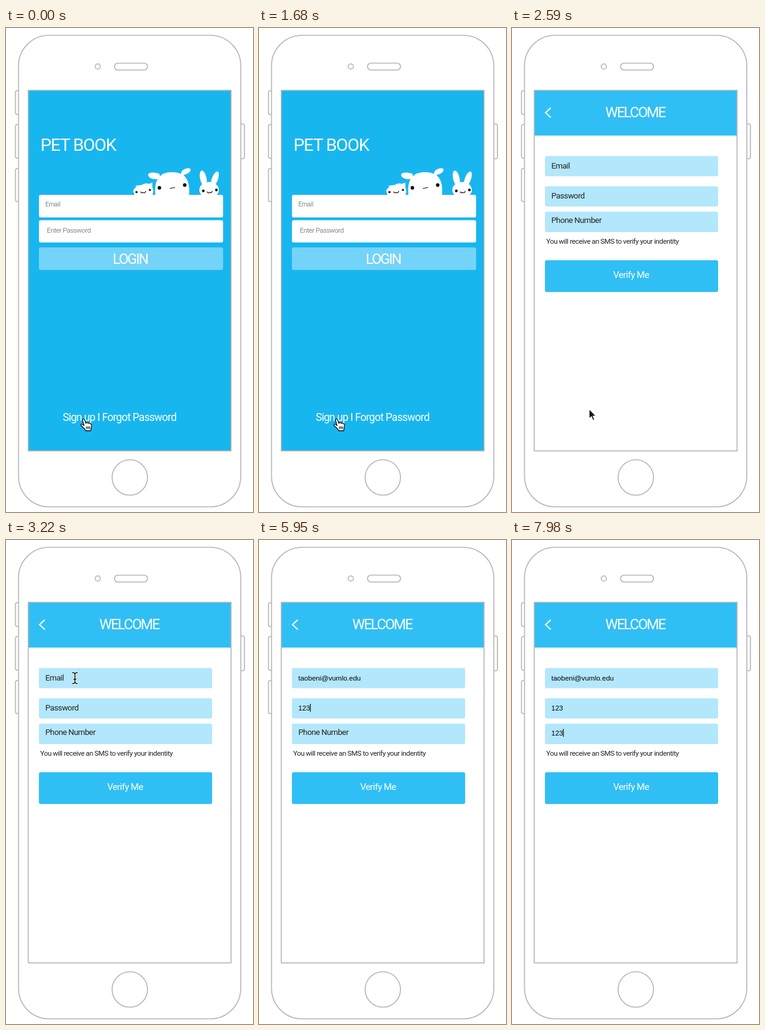
An HTML page for the animation above (8 s loop, 405 by 792 pixels).

```html
<!DOCTYPE html>
<html lang="en">
<head>
<meta charset="utf-8">
<title>Sign up flow</title>
<style>
  html, body { margin: 0; width: 100%; height: 100%; overflow: hidden; background: #fff; }
  svg { display: block; width: 100%; height: 100%; }
  text { font-family: Roboto, sans-serif; letter-spacing: -.04em; white-space: pre; }
  .caps { letter-spacing: -.08em; }
  .typed { font: 11.5px "Liberation Sans", Arial, sans-serif; letter-spacing: 0; }
  .case { fill: #fff; stroke: #b5b5b5; stroke-width: 1.6; }
  .light { fill: #fff; }
  .hint { fill: #8a8a8a; }
  .ink { fill: #222; }
</style>
</head>
<body>
<svg viewBox="0 0 405 792">
  <g class="case">
    <rect x="15.5" y="102.5" width="10" height="39" rx="3"/>
    <rect x="15.5" y="158" width="10" height="55" rx="3"/>
    <rect x="15.5" y="230" width="10" height="54" rx="3"/>
    <rect x="380" y="157" width="11" height="57" rx="3"/>
    <rect x="20.5" y="12" width="364.5" height="771.5" rx="50"/>
    <circle cx="150.5" cy="63" r="4.3"/>
    <rect x="178" y="57.5" width="54" height="11.3" rx="5.6"/>
    <circle cx="203" cy="735.5" r="29"/>
  </g>

  <g id="login">
    <rect x="36.5" y="102" width="332.5" height="590" fill="#18b6ef"/>
    <text class="light" x="56.5" y="200.5" font-size="28.5">PET BOOK</text>

    <g class="light">
      <path d="M211 273C207 266 210 262 214 260L212 258 222 257Q228 253 234 255L240 253 240 261Q243 267 240 273Z"/>
      <path d="M208 265l5 3-2 5M245 274C243 254 247 236 272 236C297 236 302 252 300 274Z"/>
      <path d="M252 246C246 249 233 247 233 240C234 235 247 236 252 239ZM287 240C286 232 296 228 302 230C305 236 296 239 291 241Z"/>
      <ellipse cx="333" cy="265" rx="16" ry="13"/>
      <ellipse cx="323.5" cy="246" rx="5.3" ry="13" transform="rotate(-12 323.5 246)"/>
      <ellipse cx="342.5" cy="247" rx="5" ry="13" transform="rotate(20 342.5 247)"/>
    </g>
    <g fill="#111">
      <circle cx="214" cy="268.5" r="1.8"/><circle cx="236" cy="265" r="1.8"/>
      <circle cx="251.5" cy="261.5" r="2.9"/><circle cx="293" cy="257" r="2.9"/>
      <circle cx="323.5" cy="266.5" r="2.2"/><circle cx="345" cy="265" r="2.2"/>
    </g>
    <path fill="none" stroke="#111" stroke-width="1.2" stroke-linecap="round"
      d="M269 262.5L277 261M221 268q1 3 4 1q3 2 4-2M330 268q1 3 4 1q3 2 4-2"/>

    <rect class="light" x="54" y="273" width="302" height="37" rx="3"/>
    <rect class="light" x="54" y="314.5" width="302" height="36.5" rx="3"/>
    <rect x="54" y="359" width="302" height="37" rx="3" fill="#74d3f8"/>
    <text class="hint" x="64.5" y="292" font-size="10.7">Email</text>
    <text class="hint" x="67" y="334.5" font-size="11.2">Enter Password</text>
    <text class="light caps" x="175" y="385.5" font-size="23.3">LOGIN</text>
    <text class="light" x="93" y="643" font-size="17.5">Sign up I Forgot Password</text>
  </g>

  <g id="signup">
    <rect x="36.5" y="102" width="332.5" height="74" fill="#30bff4"/>
    <path d="M63.5 130.5L55 138.5L63.5 146.5" fill="none" stroke="#fff" stroke-width="2"/>
    <text class="light caps" x="153" y="146" font-size="23.4">WELCOME</text>
    <g id="fields"></g>
    <text class="ink" x="56" y="352.5" font-size="11.7">You will receive an SMS to verify your indentity</text>
    <rect x="54" y="380" width="284" height="52" rx="3" fill="#30bff4"/>
    <text class="light" x="166" y="409" font-size="15.3">Verify Me</text>
  </g>

  <rect class="case" x="36.5" y="102" width="332.5" height="590" style="fill:none"/>

  <g id="pointer">
    <path id="arrow" d="M0 0V16L3.6 12.6 6.2 18.6 9 17.4 6.4 11.6H11.4Z" fill="#111" stroke="#fff" stroke-width="1.2"/>
    <g id="beam" fill="none" stroke-linecap="round">
      <path d="M-4-9Q0-9 0-6Q0-9 4-9M0-6V6M-4 9Q0 9 0 6Q0 9 4 9M-2 2H2" stroke="#fff" stroke-width="3"/>
      <path d="M-4-9Q0-9 0-6Q0-9 4-9M0-6V6M-4 9Q0 9 0 6Q0 9 4 9M-2 2H2" stroke="#111" stroke-width="1.5"/>
    </g>
    <path id="hand" fill="#fff" stroke="#111" stroke-width="1.3" stroke-linejoin="round"
      d="M-1.6 1.5C-1.6-.5 1.2-.8 2 1.2L4 7C5 5 7.4 5.6 7.7 7C9 5.6 10.8 6.2 11 7.8C12.6 7 13.6 8.4 13.4 10L12.6 15 11.8 19H3.6L2.4 16.4L-3.4 11C-5.4 8.6-2.8 7.4-1 9L1 10.6Z
         M5 12V16M7.5 12V16M10 12V16"/>
  </g>
</svg>

<script>
const LOOP = 8000, OPEN_SIGNUP = 1750, BLINK = 530, TEXT_X = 64.5;
const $ = id => document.getElementById(id);
const show = (node, on) => node.setAttribute('visibility', on ? 'visible' : 'hidden');

// Focus, first key and blur times; step is the delay between keys.
const fields = [
  { label: 'Email', value: 'taobeni@vumlo.edu', top: 209.5, height: 33, base: 230, focus: 3290, type: 3430, step: 40, blur: 4200 },
  { label: 'Password', value: '123', top: 259, height: 33, base: 279, focus: 4900, type: 5250, step: 200, blur: 7000 },
  { label: 'Phone Number', value: '123', top: 300.5, height: 33.5, base: 320, focus: 7000, type: 7350, step: 200, blur: LOOP }
];

// Pointer moves: start time, end time, start point, end point.
const moves = [
  [2520, 3150, [127, 638], [113, 226]],
  [4130, 4270, [113, 226], [111, 236]],
  [4340, 4760, [111, 236], [110, 276]],
  [6300, 6800, [110, 276], [110, 317]]
];

function svg(tag, attrs, parent) {
  const node = document.createElementNS('http://www.w3.org/2000/svg', tag);
  for (const key in attrs) node.setAttribute(key, attrs[key]);
  return parent.appendChild(node);
}

for (const f of fields) {
  const root = $('fields');
  svg('rect', { x: 54, y: f.top, width: 284, height: f.height, rx: 3, fill: '#b3e7fb' }, root);
  f.hint = svg('text', { class: 'ink', x: TEXT_X, y: f.top + (f.height > 33 ? 18.7 : 20.2), 'font-size': 13.3 }, root);
  f.text = svg('text', { class: 'typed', x: TEXT_X, y: f.base }, root);
  f.caret = svg('rect', { y: f.base - 11, width: 1.2, height: 13, fill: '#111' }, root);
}

function drawField(f, t) {
  const count = Math.max(0, Math.min(f.value.length, Math.floor((t - f.type) / f.step) + 1));
  const lastKey = count ? f.type + (count - 1) * f.step : f.focus;
  f.hint.textContent = count ? '' : f.label;
  f.text.textContent = f.value.slice(0, count);
  const caretOn = t >= f.focus && t < f.blur && (t - lastKey) % (2 * BLINK) < BLINK;
  f.caret.setAttribute('x', TEXT_X + (count ? f.text.getComputedTextLength() : 0));
  f.caret.setAttribute('opacity', caretOn ? 1 : 0);
}

function pointerAt(t) {
  let point = moves[0][2];
  for (const [start, end, from, to] of moves) {
    if (t < start) break;
    const p = Math.min(1, (t - start) / (end - start));
    const eased = p * p * (3 - 2 * p);
    point = from.map((v, i) => v + (to[i] - v) * eased);
  }
  return point;
}

function pointerShape(t, y) {
  const within = (top, bottom) => y > top && y < bottom;
  if (t < OPEN_SIGNUP || within(380, 432)) return 'hand';
  return within(212, 234) || within(261, 290) || within(303, 332) ? 'beam' : 'arrow';
}

function draw(t) {
  const signup = t >= OPEN_SIGNUP;
  show($('login'), !signup);
  show($('signup'), signup);
  for (const f of fields) drawField(f, t);

  const [x, y] = pointerAt(t);
  const typing = (t >= 3430 && t < 4130) || (t >= 5250 && t < 6300) || t >= 7350;
  const shape = typing ? '' : pointerShape(t, y);
  for (const id of ['arrow', 'beam', 'hand']) show($(id), id === shape);
  $('pointer').setAttribute('transform', `translate(${x} ${y + (shape === 'hand' ? 2 : 0)})`);
}

const started = performance.now();
(function tick() {
  draw((performance.now() - started) % LOOP);
  requestAnimationFrame(tick);
})();
</script>
</body>
</html>
```
